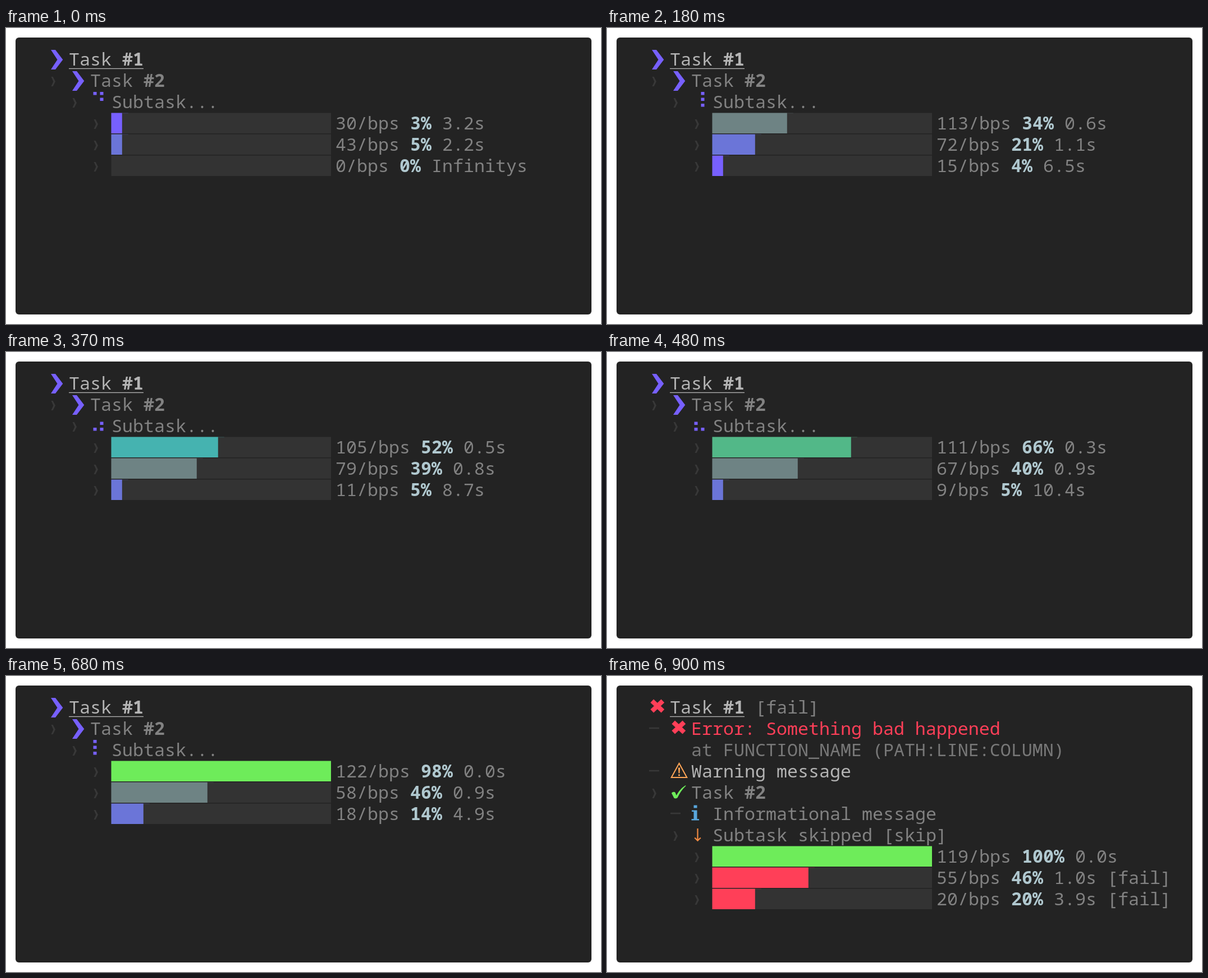
Write an HTML page that moves like this. It is 1060 px wide and 528 px high and loops after 8040 ms.

```html
<!DOCTYPE html>
<html lang="en">
<head>
<meta charset="utf-8">
<title>Task progress</title>
<style>
  html, body { margin: 0; width: 100%; height: 100%; overflow: hidden; background: #fff; }
  svg { display: block; width: 1060px; height: 528px; }
  text { font: 31.6667px "Noto Sans Mono", "DejaVu Sans Mono", monospace; white-space: pre; }
  .b { font-weight: 700; }
</style>
</head>
<body>
<svg viewBox="0 0 1060 528">
  <rect x="17" y="17" width="1026" height="494" rx="6" fill="#232323"/>
  <g id="screen"></g>
</svg>
<script>
const LOOP = 8040, CELL = 19, ROW = 38, LEFT = 74, BASE = 67;
const GRAY = '#828282', LIGHT = '#b4b4b4', DIM = '#383838', PURPLE = '#7760ff',
      RED = '#ff3f58', GREEN = '#6eec5a', ORANGE = '#ffa657', PALE = '#b0c8cf';

// Start of each state, and per bar: bytes per second, percent, seconds left
const starts = [0, 80, 180, 280, 370, 480, 580, 680, 780, 880, 900];
const bars = [
  '30 3 3.2|43 5 2.2|0 0 Infinity',
  '90 18 0.9|65 13 1.3|10 2 9.8',
  '113 34 0.6|72 21 1.1|15 4 6.5',
  '108 43 0.5|75 30 0.9|12 5 7.6',
  '105 52 0.5|79 39 0.8|11 5 8.7',
  '111 66 0.3|67 40 0.9|9 5 10.4',
  '117 82 0.2|61 43 0.9|13 9 7.0',
  '122 98 0.0|58 46 0.9|18 14 4.9',
  '119 100 0.0|55 46 1.0 fail|20 18 4.1',
  '119 100 0.0|55 46 1.0 fail|21 20 3.8',
  '119 100 0.0|55 46 1.0 fail|20 20 3.9 fail'
];
const ramp = [[5, PURPLE], [25, '#6b75d8'], [50, '#6e8384'], [60, '#45b3b0'], [90, '#52b888'], [101, GREEN]];
const spinner = '⠋⠙⠹⠸⠼⠴⠦⠧⠇⠏';

// Columns step by two cells; icons are drawn relative to column and baseline
const colX = c => LEFT + c * ROW;
const rowY = r => BASE + r * ROW;
const rect = (x, y, w, h, fill, extra = '') =>
  `<rect x="${x}" y="${y}" width="${w}" height="${h}" fill="${fill}" ${extra}/>`;
const span = (s, fill, cls = '') => `<tspan fill="${fill}" class="${cls}">${s}</tspan>`;
const text = (c, r, ...spans) => `<text x="${colX(c)}" y="${rowY(r)}">${spans.join('')}</text>`;
const at = (c, r, body) => `<g transform="translate(${colX(c)} ${rowY(r)})">${body}</g>`;
const fill = (d, color) => `<path d="${d}" fill="${color}"/>`;
const line = (d, color, w) => `<path d="${d}" fill="none" stroke="${color}" stroke-width="${w}"/>`;

const icons = {
  pointer: fill('M6-28h8L27.3-10.5 14 7H6L17.5-10.5z', PURPLE),
  chevron: fill('M6.5-18h3.2L14-9.5 9.7-1H6.5L10.3-9.5z', DIM),
  dash: rect(1, -13.3, 18, 2.6, DIM),
  cross: line('M6.2-22.6 25.4-4.6M25.4-22.6 6.2-4.6', RED, 8.2),
  check: fill('M3-10c1.5-2.6 6-3 7-.3l1.6 4.3C15.5-13 21-20 28-24l.5.9C22-17 17.500-10 13.500-1.800q-3.500 2.200-6 .5z', GREEN),
  warn: line('M16.500-25.200 30.300 0H2.700z', ORANGE, 2) +
    fill('M14.900-17.500h3.200l-.6 10h-2zM15.100-5.600h2.800v2.800h-2.800z', ORANGE),
  info: fill('M4.500-26.500h6v5h-6zM1-17.500h9.500v15.500h3.500V.5H.5V-2H4.500V-15H1z', '#58a6dc'),
  down: line('M11.500-23V-1M6.200-6.500 11.500-1.200l5.300-5.300', '#f08a42', 2.2)
};
const icon = (name, c, r) => at(c, r, icons[name]);

function spin(i, c, r) {
  const bits = spinner.charCodeAt(i % 10) - 0x2800;
  let dots = '';
  for (let k = 0; k < 6; k++)
    if (bits >> k & 1) dots += rect(k < 3 ? 5 : 17, -29 + (k % 3) * 10.5, 6, 5.500, PURPLE);
  // Column two starts one row of dots inside the cell
  return `<g transform="translate(${colX(c) + .5} ${rowY(r)})">${dots}</g>`;
}

function bar(data, r) {
  const [rate, pct, left, fail] = data.split(' ');
  const n = Math.round(pct / 5), x = 187.5, y = rowY(r) - 29.5, h = 36.500;
  const color = fail ? RED : ramp.find(s => pct < s[0])[1];
  const w = n === 20 ? 391.500 : n * CELL + .3;
  let out = icon('chevron', 2, r) + rect(x, y, 391.500, h, '#333');
  if (n) out += rect(x, y, w, h, color);
  if (n && n < 20) out += rect(x + w, y, 11, .8, color, 'opacity=".3"');
  return out + `<text x="587" y="${rowY(r)}">` +
    span(`${rate}/bps `, GRAY) + span(`${pct}%`, PALE, 'b') +
    span(` ${left}s${fail ? ' [fail]' : ''}`, GRAY) + '</text>';
}

const title = tail => text(1, 0, span('Task ', LIGHT), span('#1', LIGHT, 'b'), span(tail, GRAY)) +
  rect(112, 71.800, 133, 1.300, LIGHT);
const second = r => icon('chevron', 0, r) + text(2, r, span('Task ', GRAY), span('#2', GRAY, 'b'));

const running = i => icon('pointer', 0, 0) + title('') +
  second(1) + icon('pointer', 1, 1) +
  icon('chevron', 1, 2) + spin(i + 1, 2, 2) + text(3, 2, span('Subtask...', GRAY));

const finished = () => icon('cross', 0, 0) + title(' [fail]') +
  icon('dash', 0, 1) + icon('cross', 1, 1) + text(2, 1, span('Error: Something bad happened', RED)) +
  text(2, 2, span('at FUNCTION_NAME (PATH:LINE:COLUMN)', '#787878')) +
  icon('dash', 0, 3) + icon('warn', 1, 3) + text(2, 3, span('Warning message', LIGHT)) +
  second(4) + icon('check', 1, 4) +
  icon('dash', 1, 5) + icon('info', 2, 5) + text(3, 5, span('Informational message', GRAY)) +
  icon('chevron', 1, 6) + icon('down', 2, 6) + text(3, 6, span('Subtask skipped [skip]', GRAY));

const screen = document.getElementById('screen');
const last = starts.length - 1;
let shown = -1;

function draw(t) {
  let i = last;
  while (starts[i] > t) i--;
  if (i === shown) return;
  shown = i;
  const top = i === last ? 7 : 3;
  screen.innerHTML = (i === last ? finished() : running(i)) +
    bars[i].split('|').map((b, k) => bar(b, top + k)).join('');
}

const begin = performance.now();
function tick() {
  draw((performance.now() - begin) % LOOP);
  requestAnimationFrame(tick);
}
tick();
</script>
</body>
</html>
```
